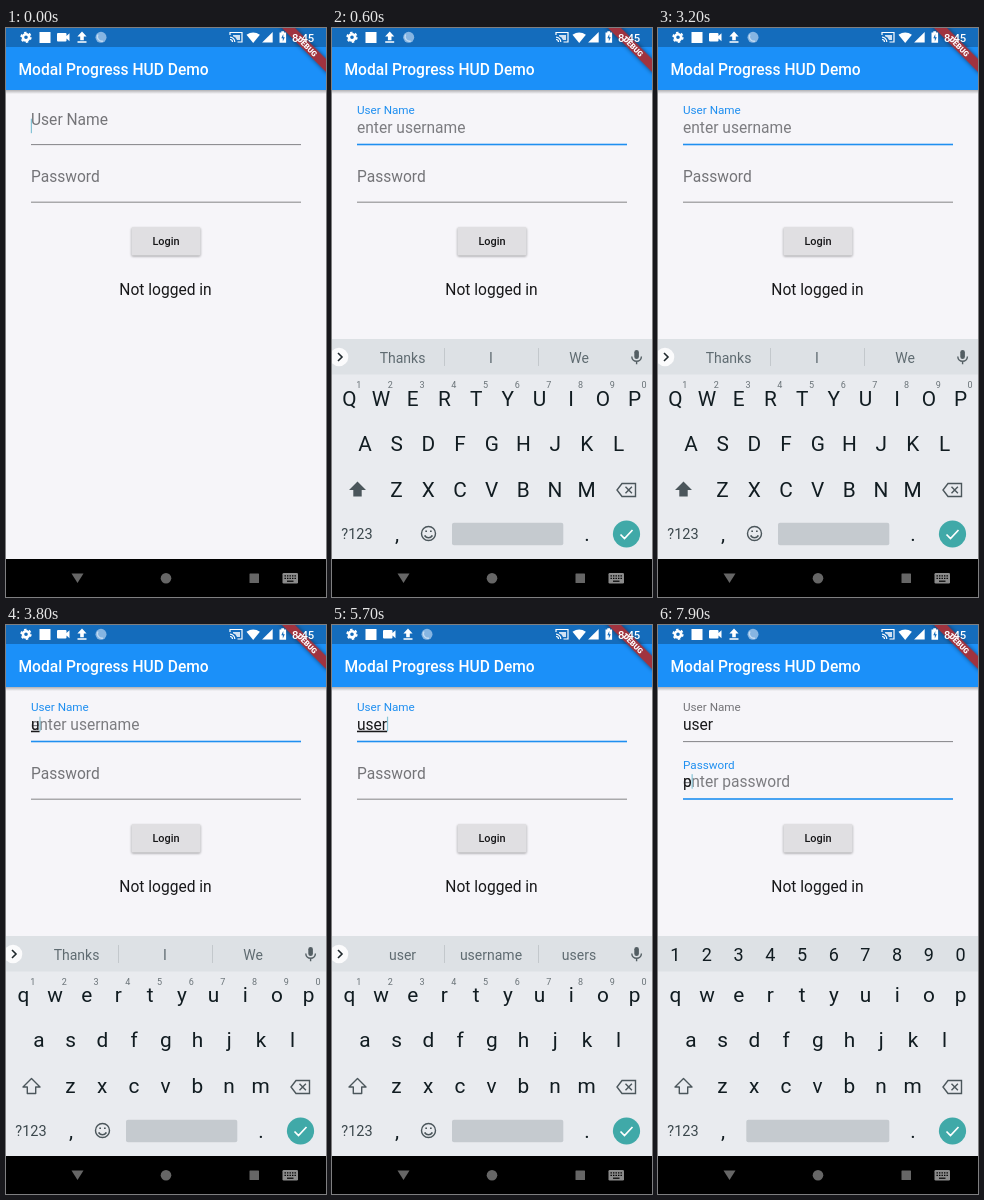
Write an HTML page that moves like this. It is 320 by 569 pixels and loops after 8 s.

```html
<!DOCTYPE html>
<html lang="en">
<head>
<meta charset="utf-8">
<title>Login form demo</title>
<style>
  html, body { margin: 0; width: 100%; height: 100%; overflow: hidden; background: #f6f5f9; }
  svg { display: block; width: 320px; height: 569px; font-family: Roboto, "Noto Sans", sans-serif; }
  text { white-space: pre; }
  .mid { text-anchor: middle; }
  .key { font-size: 20.8px; fill: #111c21; }
  .sup { font-size: 9px; fill: #697277; }
  .sug { font-size: 14px; fill: #5f6b71; }
  .body { font-size: 15.57px; fill: #18181a; }
  .hint { font-size: 15.57px; fill: #7c7c80; }
</style>
</head>
<body>
<svg viewBox="0 0 320 569" xmlns="http://www.w3.org/2000/svg">
  <defs>
    <linearGradient id="shade" x2="0" y2="1">
      <stop offset="0" stop-color="#000" stop-opacity=".28"/>
      <stop offset="1" stop-color="#000" stop-opacity="0"/>
    </linearGradient>
  </defs>
  <rect width="320" height="569" fill="#f6f5f9"/>
  <rect y="62" width="320" height="4" fill="url(#shade)"/>
  <rect width="320" height="62" fill="#1b90f9"/>
  <rect width="320" height="19" fill="#146cbc"/>
  <text x="12.5" y="46.5" font-size="15.57" font-weight="500" fill="#fff">Modal Progress HUD Demo</text>

  <g id="form"></g>
  <g style="filter:drop-shadow(0 1px 1px rgba(0,0,0,.35))">
    <rect x="125.5" y="199" width="69" height="28.5" rx="1.6" fill="#e0dfe2"/>
  </g>
  <text class="mid" x="160" y="217" font-size="10.9" font-weight="500" fill="#161618">Login</text>
  <text class="mid body" x="159.5" y="266.5">Not logged in</text>

  <g transform="translate(320 0) rotate(45)">
    <rect x="-34" y="21.8" width="68" height="9.3" fill="#a0333f" style="filter:drop-shadow(0 0 2px rgba(0,0,0,.5))"/>
    <text class="mid" y="29.1" font-size="7.6" font-weight="900" fill="#fff">DEBUG</text>
  </g>

  <g id="status" fill="#fff">
    <circle cx="20" cy="9.3" r="3.1" fill="none" stroke="#fff" stroke-width="2.6"/>
    <circle cx="20" cy="9.3" r="4.8" fill="none" stroke="#fff" stroke-width="1.7" stroke-dasharray="2.5 2.526"/>
    <rect x="33.5" y="4" width="11" height="11"/>
    <path id="camera" d="M52 5h7.5q1 0 1 1v2l3-2.7v8l-3-2.7v2q0 1-1 1H52q-1 0-1-1V6q0-1 1-1z"/>
    <g id="shifting">
      <path d="M76 3.6l4.6 4.8h-2.8v3.8h-3.6V8.400h-2.800zM71.500 13.200h9v1.600h-9z"/>
      <circle cx="95" cy="9.300" r="5.500" fill="#86b5e2"/>
      <path d="M92 6.500a4.500 4.500 0 0 0 5 6.600" fill="none" stroke="#c3dbf2" stroke-width="1.300"/>
    </g>
    <path d="M224 7V4.500h12v9.500h-4.500M224 9.200a4.800 4.800 0 0 1 4.800 4.800M224 11.500a2.500 2.500 0 0 1 2.500 2.500" fill="none" stroke="#fff" stroke-width="1.200"/>
    <path d="M227 7h7v5h-3q-1-3-4-3.800z" opacity=".8"/>
    <path d="M240.500 6.800q6.700-4.800 13.400 0L247.200 15z"/>
    <path d="M266.700 4v10.600h-10.600z"/>
    <path d="M275.300 3.300h2.800v1.200h2v10.300h-6.600V4.500h1.800z"/>
    <path d="M277.300 6l-2 4.200h1.500v3.200l2-4.200h-1.500z" fill="#146cbc"/>
    <text x="286" y="13.500" font-size="11.300" font-weight="500">8:45</text>
  </g>

  <rect y="531" width="320" height="38"/>
  <g fill="#666">
    <path d="M65.500 545.500h12l-6 9.500z"/>
    <circle cx="160" cy="550.300" r="5.300"/>
    <rect x="243.500" y="545.500" width="9.500" height="9.500" rx=".6"/>
    <rect x="276.500" y="545" width="15.500" height="10.500" rx="1.200" fill="#8b8b8b"/>
    <path d="M278.500 547.800h11.500M278.500 550.300h11.500" stroke="#000" stroke-width="1.300" stroke-dasharray="1.400 1.100"/>
    <path d="M281 553.200h6.500" stroke="#000" stroke-width="1.200"/>
  </g>
  <g id="keyboard"></g>
</svg>

<script>
const LOOP = 8000, STEP = 100;
const BLUE = "#1f8ff0", GREY = "#747478";
const $ = id => document.getElementById(id);
const clamp = v => Math.max(0, Math.min(1, v));
const ease = p => p * p * (3 - 2 * p);
const mix = (a, b, p) => a + (b - a) * p;
const show = (el, on) => { el.style.display = on ? "" : "none"; };
const set = (el, attrs) => { for (const k in attrs) el.setAttribute(k, attrs[k]); };

// Form fields
const fields = [
  { id: "user", label: "User Name", hint: "enter username", top: 0 },
  { id: "pass", label: "Password", hint: "enter password", top: 57.5 }
];
$("form").innerHTML = fields.map(f => `
  <g transform="translate(0 ${f.top})">
    <text id="${f.id}Label" x="25">${f.label}</text>
    <text id="${f.id}Hint" class="hint" x="25" y="104.700">${f.hint}</text>
    <text id="${f.id}Text" class="body" x="25" y="104.700"></text>
    <rect id="${f.id}Cursor" width="1.200" height="14.500" fill="#86c3d6"/>
    <rect id="${f.id}Line" x="25" width="270"/>
  </g>`).join("");

function drawField(id, s) {
  const p = ease(s.float), value = $(id + "Text");
  set($(id + "Label"), {
    y: mix(96.8, 86, p), "font-size": mix(15.57, 11.68, p),
    fill: s.focus && s.float ? BLUE : GREY
  });
  $(id + "Hint").style.opacity = s.hint;
  if (value.textContent !== s.text) value.textContent = s.text;
  value.style.textDecoration = s.composing ? "underline" : "none";
  const width = s.text ? value.getComputedTextLength() : 0;
  set($(id + "Cursor"), { x: 24.8 + width, y: s.float ? 91.7 : 90.7 });
  show($(id + "Cursor"), s.focus && s.cursor);
  const active = s.focus && s.float > 0;
  set($(id + "Line"), { y: active ? 115.7 : 116.2, height: active ? 1.6 : 0.9, fill: active ? BLUE : "#77777a" });
}

// Keyboard
const PITCH = 31.7;
const row = (chars, x, y, cls = "key", size = "") => [...chars].map((c, i) =>
  `<text class="mid ${cls}" x="${x + i * PITCH}" y="${y}" ${size}>${c}</text>`).join("");
const letters = (rows, dy) =>
  row(rows[0], 17.3, 377.6 - dy) + row(rows[1], 33, 423.3 - dy) + row(rows[2], 64.500, 469 - dy);
const lower = ["qwertyuiop", "asdfghjkl", "zxcvbnm"];
const upper = lower.map(s => s.toUpperCase());
const shiftPath = "M25.500 453.500l8.500 8.500h-4.300v6.500h-8.400V462H17z";

$("keyboard").innerHTML = `
  <rect y="311" width="320" height="220" fill="#e9ebef"/>
  <rect y="311" width="320" height="35.500" fill="#dde1e5"/>
  <g id="suggest">
    <circle cx="7" cy="329" r="9.300" fill="#fbfbfc"/>
    <path d="M6 325l4 4-4 4" fill="none" stroke="#20292d" stroke-width="1.600"/>
    ${[70.5, 159, 247].map((x, i) => `<text id="word${i}" class="mid sug" x="${x}" y="334.600"></text>`).join("")}
    <path d="M112.500 320v18M206.500 320v18" stroke="#c3c8cc"/>
    <rect x="302.300" y="322" width="4.600" height="9" rx="2.300" fill="#535e63"/>
    <path d="M299.800 328.500a4.800 4.800 0 0 0 9.600 0M304.600 333.300v3" fill="none" stroke="#535e63" stroke-width="1.400"/>
    ${row("1234567890", 26.7, 360.3, "sup")}
  </g>
  <g id="digits">${row("1234567890", 17.2, 336.3, "key", 'style="font-size:18px"')}</g>
  <g id="upper">${letters(upper, 0)}<path d="${shiftPath}" fill="#4b565b"/></g>
  <g id="lower">${letters(lower, 1)}<path d="${shiftPath}" fill="none" stroke="#4b565b" stroke-width="1.400" stroke-linejoin="round"/></g>
  <path d="M290 455.500h13.500v13H290l-5-6.500zM293.500 458.800l6.400 6.400m0-6.400l-6.400 6.400" fill="none" stroke="#4b565b" stroke-width="1.400"/>
  <text x="9.300" y="511" font-size="14.500" fill="#3b474c">?123</text>
  <text class="mid key" x="65" y="513">,</text>
  <text class="mid key" x="255" y="513">.</text>
  <g id="emoji" fill="none" stroke="#4b565b" stroke-width="1.400">
    <circle cx="96.500" cy="505.500" r="7"/>
    <path d="M92.700 507.300a4.200 4.200 0 0 0 7.600 0M93.300 503.300h1.700M98 503.300h1.700" stroke-width="1.600"/>
  </g>
  <rect id="space" y="494.800" height="22.400" rx="2" fill="#c5cacf"/>
  <circle cx="294.500" cy="506" r="13.600" fill="#40a9a8"/>
  <path d="M288.500 506.500l4 4 8-8.500" fill="none" stroke="#fff" stroke-width="1.700"/>`;

// [time, value] tables; the last entry reached applies
const typed = [[0, ""], [3800, "u"], [3900, "us"], [4100, "use"], [4200, "user"]];
const words = [[0, ["Thanks", "I", "We"]], [4200, ["user", "username", "users"]]];
const slide = [[0, 0], [300, 0.12], [400, 0.52], [500, 0.92], [600, 1]];
const at = (table, t) => table.reduce((v, [time, next]) => t >= time ? next : v, table[0][1]);

const FOCUS_PASS = 6400, TYPE_PASS = 7900;
const appear = (t, start) => clamp((t - start + 50) / 200);
const vanish = (t, start) => 1 - clamp((t - start) / 200);
const odd = n => ((n % 2) + 2) % 2 === 1;

function render(now) {
  const t = Math.floor(now / STEP) * STEP;
  const onPass = t >= FOCUS_PASS;
  const numeric = t >= FOCUS_PASS + STEP;

  const floatUser = appear(t, 100), floatPass = appear(t, FOCUS_PASS);
  drawField("user", {
    focus: !onPass, float: floatUser, text: at(typed, t),
    hint: floatUser * vanish(t, 3800), composing: !onPass && t >= 3800,
    cursor: odd(Math.floor((t - 200) / 500))
  });
  drawField("pass", {
    focus: onPass, float: floatPass, text: t >= TYPE_PASS ? "p" : "",
    hint: floatPass * vanish(t, TYPE_PASS), composing: false,
    cursor: t >= TYPE_PASS || !odd(Math.floor((t - FOCUS_PASS) / 500))
  });

  const camera = t < 200 || t >= 800;
  show($("camera"), camera);
  set($("shifting"), { transform: `translate(${camera ? 0 : -18.3} 0)` });

  const p = at(slide, t);
  set($("keyboard"), { transform: `translate(0 ${114 * (1 - p)})`, opacity: p });
  at(words, t).forEach((w, i) => { $("word" + i).textContent = w; });
  const caps = t < 3800;
  show($("upper"), caps);
  show($("lower"), !caps);
  show($("suggest"), !numeric);
  show($("digits"), numeric);
  show($("emoji"), !numeric);
  const left = numeric ? 88.300 : 120;
  set($("space"), { x: left, width: 231.300 - left });
}

const start = performance.now();
function tick() {
  render((performance.now() - start) % LOOP);
  requestAnimationFrame(tick);
}
tick();
</script>
</body>
</html>
```
